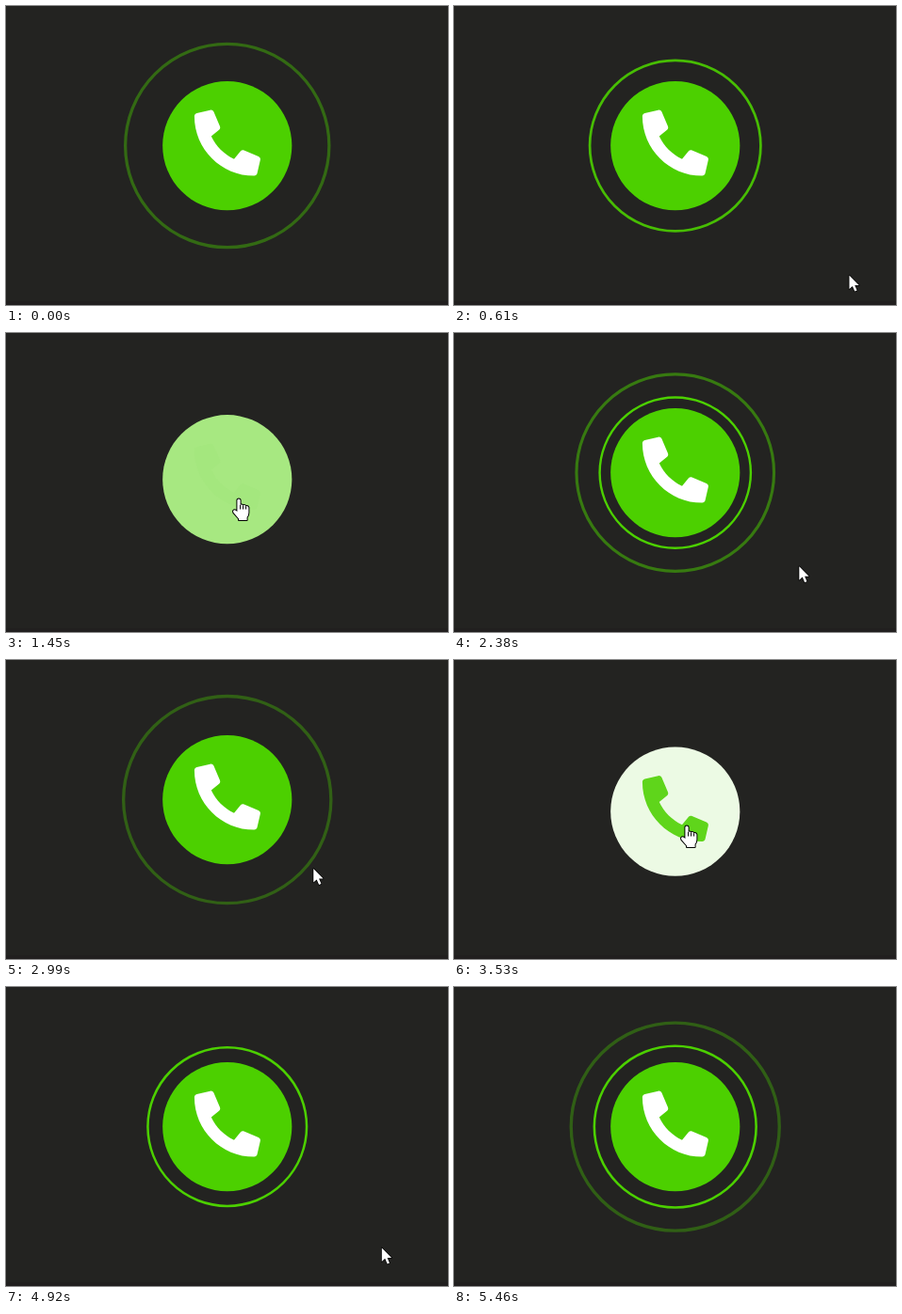
Animation, 469 px wide and 318 px high, one loop 5.54 s. Source, as an HTML page with a canvas:

```html
<!DOCTYPE html>
<html lang="en">
<head>
<meta charset="utf-8">
<title>Call button</title>
<style>
  html, body { margin: 0; width: 100%; height: 100%; overflow: hidden; background: #232321; }
  canvas { display: block; }
</style>
</head>
<body>
<canvas id="stage" width="469" height="318"></canvas>
<script>
const ctx = document.getElementById('stage').getContext('2d');
const LOOP = 5540, STEPS = 72, STEP = LOOP / STEPS;
const CENTER = { x: 234.75, y: 148.6 }, RADIUS = 68.6, DROP = 14;
const GREEN = [76, 208, 0], WHITE = [255, 255, 255];

// Ring timing: the second ring trails the first
const PULSE = 1480, PULSE_START = -200, RING_DELAY = 506;
const RING_FROM = 51, RING_TO = 123;

// Hover spans; easing applies on entry only
const HOVERS = [[1200, 2310], [3125, 4430]];
const HOVER_EASE = 520;

// Pointer path: time, x, y of the tip
const PATH = [
  [420, 419, 318], [610, 420, 287], [690, 412, 280], [1160, 300, 215],
  [1230, 268, 195], [1380, 247, 177], [1960, 247, 177], [2300, 345, 232],
  [2380, 366, 248], [2500, 373, 252], [2620, 373, 252], [2990, 330, 224],
  [3150, 275, 195], [3300, 247, 177], [4050, 247, 177], [4390, 345, 225],
  [4560, 374, 247], [4690, 384, 256], [5150, 413, 298]
];

const PHONE = new Path2D('M493.4 24.6l-104-24c-11.3-2.6-22.9 3.3-27.5 13.9l-48 112c-4.2 9.8-1.4 21.3 6.9 28l60.6 49.6c-36 76.7-98.9 140.5-177.2 177.2l-49.6-60.6c-6.8-8.3-18.2-11.1-28-6.9l-112 48C3.9 366.5-2 378.1.6 389.4l24 104C27.1 504.2 36.7 512 48 512c256.1 0 464-207.5 464-464 0-11.2-7.7-20.9-18.6-23.4z');
const ARROW = new Path2D('M0 0V14.5L3.4 11.4L5.8 17L8.2 16L5.8 10.5H10.3Z');
const HAND = new Path2D('M-1.6 13V1Q-1.6 -.5 0 -.5Q1.6 -.5 1.6 1V6Q3 4.8 4.6 6.4Q6.4 5.4 7.6 7.2Q9.6 6.4 10.4 8.6V14Q10.4 17 8.6 19V22H0V20.4L-5.6 14Q-6.6 12 -5 11.3Q-3.4 11 -1.6 13Z');
const KNUCKLES = new Path2D('M1.6 6V10.5M4.6 6.4V10.5M7.6 7.2V10.5');

const smooth = p => p * p * (3 - 2 * p);
const mix = (a, b, p) => `rgb(${a.map((v, i) => Math.round(v + (b[i] - v) * p))})`;

function hoverAt(t) {
  const span = HOVERS.find(([from, to]) => t >= from && t < to);
  return span ? smooth(Math.min(1, (t - span[0]) / HOVER_EASE)) : -1;
}

function pointerAt(t) {
  const i = PATH.findIndex(point => point[0] > t);
  if (i < 1) return null;
  const [t0, x0, y0] = PATH[i - 1], [t1, x1, y1] = PATH[i];
  const p = (t - t0) / (t1 - t0);
  return { x: x0 + (x1 - x0) * p, y: y0 + (y1 - y0) * p };
}

function drawRing(t) {
  const phase = ((t - PULSE_START) / PULSE % 1 + 1) % 1;
  const r = RING_FROM + (RING_TO - RING_FROM) * phase;
  const blur = Math.max(0, (r - 85) * 0.03);
  ctx.save();
  ctx.globalAlpha = Math.min(1, 2 - 2 * phase);
  if (blur) ctx.filter = `blur(${blur}px)`;
  ctx.strokeStyle = mix(GREEN, WHITE, 0);
  ctx.lineWidth = r * 0.03;
  ctx.beginPath();
  ctx.arc(CENTER.x, CENTER.y, r, 0, Math.PI * 2);
  ctx.stroke();
  ctx.restore();
}

function drawButton(hover) {
  ctx.save();
  ctx.translate(0, DROP * hover);
  ctx.fillStyle = mix(GREEN, WHITE, hover);
  ctx.beginPath();
  ctx.arc(CENTER.x, CENTER.y, RADIUS, 0, Math.PI * 2);
  ctx.fill();
  ctx.translate(269.9, 110.6);
  ctx.scale(-0.1367, 0.1367);
  ctx.fillStyle = mix(WHITE, GREEN, hover);
  ctx.fill(PHONE);
  ctx.restore();
}

function drawPointer({ x, y }) {
  const overButton = Math.hypot(x - CENTER.x, y - CENTER.y) < 80;
  ctx.save();
  ctx.translate(x, y);
  ctx.fillStyle = '#fff';
  ctx.strokeStyle = '#000';
  ctx.lineJoin = 'round';
  if (overButton) {
    ctx.lineWidth = 2;
    ctx.stroke(HAND);
    ctx.fill(HAND);
    ctx.lineWidth = 1;
    ctx.stroke(KNUCKLES);
  } else {
    ctx.lineWidth = 1.5;
    ctx.stroke(ARROW);
    ctx.fill(ARROW);
  }
  ctx.restore();
}

function draw(t) {
  ctx.fillStyle = '#232321';
  ctx.fillRect(0, 0, 469, 318);
  ctx.fillStyle = '#211f1f';
  ctx.fillRect(0, 314, 469, 4);

  const hover = hoverAt(t);
  if (hover < 0) {
    drawRing(t);
    drawRing(t - RING_DELAY);
  }
  drawButton(Math.max(0, hover));
  const pointer = pointerAt(t);
  if (pointer) drawPointer(pointer);
}

const start = performance.now();
function tick() {
  const t = (performance.now() - start) % LOOP;
  // Stepped like a screen recording; the small lead absorbs rounded frame times
  draw(Math.min(STEPS - 1, Math.floor((t + 12) / STEP)) * STEP);
  requestAnimationFrame(tick);
}
tick();
</script>
</body>
</html>
```
